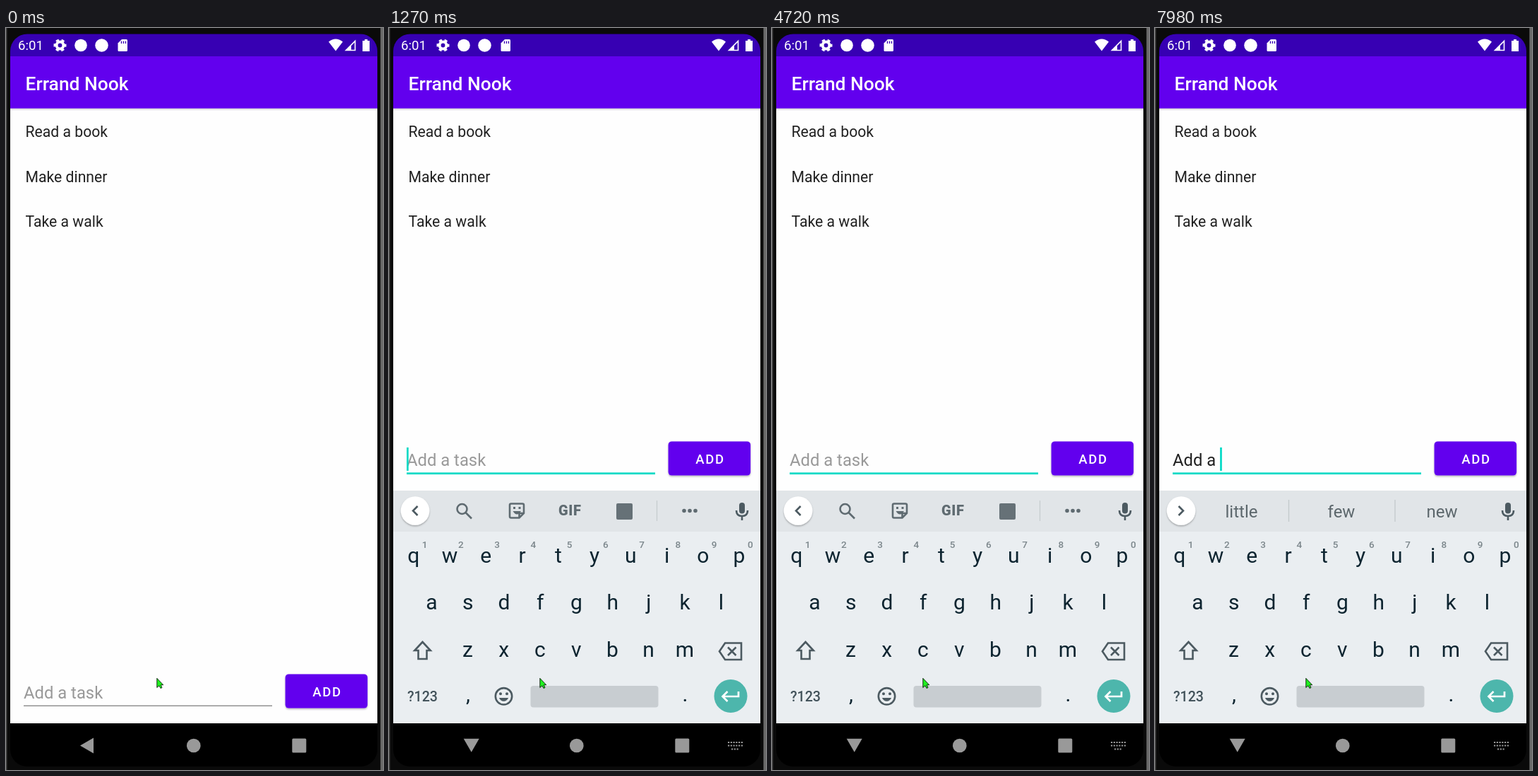
An HTML page for the animation above (8 s loop, 534 by 1049 pixels).

```html
<!DOCTYPE html>
<html lang="en">
<head>
<meta charset="utf-8">
<title>To-do app</title>
<style>
  html, body { margin: 0; width: 100%; height: 100%; overflow: hidden; background: #0a0a0a; }
  svg { display: block; width: 534px; height: 1049px; font-family: Roboto, sans-serif; }
  text { white-space: pre; }
  .mid { text-anchor: middle; }
  .medium { font-weight: 500; }
  .line { fill: none; stroke: #4c5a61; stroke-width: 2.6; }
  .tool { fill: none; stroke: #5f6b71; stroke-width: 2.6; }
</style>
</head>
<body>
<svg viewBox="0 0 534 1049">
  <defs>
    <clipPath id="screen"><rect x="6" y="8.5" width="520" height="1035.5" rx="24"/></clipPath>
    <linearGradient id="fade" x2="0" y2="1">
      <stop stop-color="#000" stop-opacity=".16"/><stop offset="1" stop-color="#000" stop-opacity="0"/>
    </linearGradient>
    <filter id="shadow" x="-20%" y="-20%" width="140%" height="150%">
      <feDropShadow dx="0" dy="1.5" stdDeviation="1.3" flood-opacity=".3"/>
    </filter>
  </defs>

  <rect width="534" height="1049" fill="#0a0a0a"/>
  <path d="M.7 0V1049" stroke="#484848" stroke-width="1.4"/>
  <path d="M532.2 0V1049" stroke="#6a6a6a" stroke-width="3.6"/>

  <g clip-path="url(#screen)">
    <rect x="6" y="8" width="520" height="1036" fill="#000"/>
    <rect x="6" y="113" width="520" height="870" fill="#fefefe"/>
    <rect x="6" y="8" width="520" height="32" fill="#3700b3"/>
    <rect x="6" y="40" width="520" height="73.7" fill="#6200ee"/>
    <rect x="6" y="113.7" width="520" height="3.5" fill="url(#fade)"/>
  </g>

  <g fill="#fff">
    <text x="17" y="31.3" font-size="18.6">6:01</text>
    <g fill="none" stroke="#fff">
      <circle cx="76.5" cy="24.5" r="4.9" stroke-width="4"/>
      <circle cx="76.5" cy="24.5" r="7.5" stroke-width="3" stroke-dasharray="4.2 3.654" stroke-dashoffset="2.1"/>
    </g>
    <circle cx="106" cy="24.5" r="8.8"/>
    <circle cx="135.5" cy="24.5" r="9.3"/>
    <path d="M164 16H170.5Q172 16 172 17.5V31.5Q172 33 170.5 33H160Q158.5 33 158.5 31.5V21.5Z"/>
    <path d="M163.5 18.5v3.5M166.5 18.5v3.5M169.5 18.5v3.5" stroke="#3700b3" stroke-width="1.3"/>
    <path d="M457 19.5Q467 11.5 477 19.5L467 32.5Z"/>
    <path d="M481.5 31.5L494.5 18.5V31.5Z" fill="none" stroke="#fff" stroke-width="1.6"/>
    <path d="M481 32L489 24V32Z"/>
    <path d="M508 16h4v2h3v15h-10v-15h3z"/>
    <text class="medium" x="27.5" y="87.5" font-size="26.4">Errand Nook</text>
  </g>

  <g font-size="21.2" fill="#212121">
    <text x="27.5" y="154">Read a book</text>
    <text x="27.5" y="217.5">Make dinner</text>
    <text x="27.5" y="281">Take a walk</text>
  </g>

  <g id="form">
    <text id="entry" x="25" y="619" font-size="23.8"></text>
    <path id="composing" stroke="#212121" stroke-width="1.5"/>
    <rect id="rule" x="25" width="352"/>
    <rect id="caret" y="593" width="2.7" height="33" fill="#03dac5"/>
    <rect x="395.6" y="584.4" width="116.5" height="48.2" rx="5" fill="#6200ee" filter="url(#shadow)"/>
    <text class="mid medium" x="455" y="615.5" font-size="18.5" letter-spacing="1.65" fill="#fff">ADD</text>
  </g>

  <g fill="#999">
    <path id="back" d="M105 1014.5L124 1003.5V1025.5Z"/>
    <circle cx="265.8" cy="1014.5" r="9.8"/>
    <rect x="405.3" y="1004.5" width="20" height="20" rx="1.5"/>
    <path id="switcher" fill="none" stroke="#999" stroke-width="2.2" stroke-dasharray="2.2 1.56"
      d="M480 1010h21M480 1014.5h21M485 1019.5h11"/>
  </g>

  <g id="keyboard">
    <rect x="6" y="654" width="520" height="329" fill="#eaeef1"/>
    <rect x="6" y="654" width="520" height="58" fill="#e1e5e8"/>
    <circle cx="37" cy="682.5" r="20.3" fill="#fff" filter="url(#shadow)"/>
    <path id="chevron" class="line" d="M40.5 676L34 682.5L40.5 689"/>

    <g id="tools">
      <circle class="tool" cx="103.5" cy="680" r="7"/>
      <path class="tool" d="M108.5 685L117 693.5"/>
      <path class="tool" d="M173 672.5H189Q191 672.5 191 674.5V686L184.5 692.5H173Q171 692.5 171 690.5V674.5Q171 672.5 173 672.5ZM184.5 692V686H191"/>
      <path d="M176 677h3v3h-3zM183.5 677h3v3h-3zM175.500 683H187Q181.200 692 175.500 683Z" fill="#5f6b71"/>
      <text class="mid" x="256.3" y="689.3" font-size="20" font-weight="800" letter-spacing=".7" fill="#5f6b71">GIF</text>
      <rect x="322" y="672" width="23" height="23" rx="2" fill="#667177"/>
      <path d="M379.5 668V697" stroke="#c6cccf" stroke-width="1.3"/>
      <path d="M418 682.5h.01M426 682.5h.01M434 682.5h.01" stroke="#5f6b71" stroke-width="5.6" stroke-linecap="round"/>
    </g>
    <g id="suggestions" class="mid" font-size="24" fill="#5c676c">
      <path d="M189.5 667V698M340 667V698" stroke="#c3c9cc" stroke-width="1.3"/>
      <text x="122.5" y="692"></text><text x="264" y="692"></text><text x="406.5" y="692"></text>
    </g>
    <rect x="496" y="671" width="8" height="15.5" rx="4" fill="#4c5a61"/>
    <path class="line" d="M492 682Q492 690 500 690T508 682M500 690V696"/>

    <g id="keys" class="mid" font-size="30" fill="#0d2430"></g>
    <path class="line" d="M47.500 868L36.300 880H41.500V892H53.500V880H58.700Z"/>
    <path class="line" d="M476 869.5H499V893H476L468 881.3ZM480 875.5L491.5 887M491.5 875.5L480 887"/>
    <text class="mid medium" x="47.5" y="952" font-size="19.6" fill="#42525a">?123</text>
    <circle class="line" cx="162.5" cy="944.8" r="11.7"/>
    <path d="M155.900 947.100H169.100Q167 951.800 162.500 951.800T155.900 947.100Z" fill="#4c5a61"/>
    <circle cx="158" cy="941.3" r="2" fill="#4c5a61"/>
    <circle cx="167" cy="941.3" r="2" fill="#4c5a61"/>
    <rect x="200.5" y="930" width="181" height="30.5" rx="4" fill="#c8cdd1"/>
    <circle cx="484" cy="944.5" r="23.5" fill="#4db6ac"/>
    <path d="M495 938V945H473M479.5 938L472.5 945L479.5 952" fill="none" stroke="#fff" stroke-width="2.7"/>
  </g>

  <path d="M213.800 919.300V932.500L217 929.800L219 933.500L221 932.500L219.300 928.700H222.800Z" fill="#20f020" stroke="#000" stroke-width=".8"/>
</svg>

<script>
const LOOP = 8000, FOCUS = 370, LIFT = 620, SLIDE = 740, SETTLED = 860, TYPING = 5990;
const FIELD_X = 25, DROP = 329, KEY_STEP = 51.25;
const $ = id => document.getElementById(id);

// Times at which the caret turns on or off, starting hidden.
const blinks = [370, 740, 1270, 1780, 2290, 2800, 3300, 3800, 4300, 4720, 5220, 5740, 5990, 6990, 7240];

// start time, typed text, length of the composing word, suggestions
const steps = [
  [TYPING, "A", 1, "A And Are"],
  [6370, "Ad", 2, "Ad Add And"],
  [6490, "Add", 3, "Add Address And"],
  [7240, "Add ", 0, "Add Address And"],
  [7360, "Add ", 0, "to the a"],
  [7740, "Add a", 1, "to the a"],
  [7860, "Add a", 1, "a and are"],
  [7980, "Add a ", 0, "little few new"]
];

function addKeys(letters, x, y, numbered) {
  [...letters].forEach((letter, i) => {
    const cx = x + i * KEY_STEP;
    $("keys").innerHTML += `<text x="${cx}" y="${y}">${letter}</text>`;
    if (numbered) $("keys").innerHTML +=
      `<text class="medium" x="${cx + 15.7}" y="735" font-size="13.5" fill="#7b868b">${(i + 1) % 10}</text>`;
  });
}
addKeys("qwertyuiop", 34.8, 756, true);
addKeys("asdfghjkl", 60.4, 822);
addKeys("zxcvbnm", 111.4, 889);
addKeys(",", 112, 952);
addKeys(".", 419.5, 952);

const show = (id, on) => $(id).setAttribute("display", on ? "inline" : "none");
const set = (id, attrs) => Object.entries(attrs).forEach(([k, v]) => $(id).setAttribute(k, v));

function drawField(t, step) {
  const focused = t >= FOCUS, entry = $("entry");
  const [, text, composing, words] = step || [0, "", 0, ""];
  set("form", { transform: `translate(0 ${t < LIFT ? DROP : 0})` });
  set("rule", focused ? { y: 628.4, height: 2.7, fill: "#03dac5" }
                      : { y: 628.6, height: 1.2, fill: "#777" });
  entry.textContent = text || "Add a task";
  set("entry", { fill: text ? "#212121" : "#999" });

  const end = FIELD_X + (text ? entry.getComputedTextLength() : 0);
  const start = composing
    ? end - entry.getSubStringLength(text.length - composing, composing) : end;
  set("composing", { d: `M${start} 622.3H${end}` });
  show("composing", composing);
  set("caret", { x: end });
  show("caret", blinks.filter(b => b <= t).length % 2);

  const slots = $("suggestions").querySelectorAll("text");
  words.split(" ").forEach((word, i) => slots[i].textContent = word);
}

function draw(t) {
  const step = steps.filter(s => s[0] <= t).pop();
  drawField(t, step);
  show("tools", !step);
  show("suggestions", step);
  set("chevron", { transform: step ? "rotate(180 37 682.5)" : "" });
  show("keyboard", t >= SLIDE);
  set("keyboard", t < SETTLED ? { transform: "translate(0 8.5)", opacity: .87 }
                              : { transform: "", opacity: 1 });
  show("switcher", t >= LIFT);
  const angle = t < LIFT ? 0 : t < SLIDE ? -27 : -90;
  set("back", { transform: `rotate(${angle} 115.5 1013.3)` });
}

function tick() {
  draw(performance.now() % LOOP);
  requestAnimationFrame(tick);
}
tick();
</script>
</body>
</html>
```
